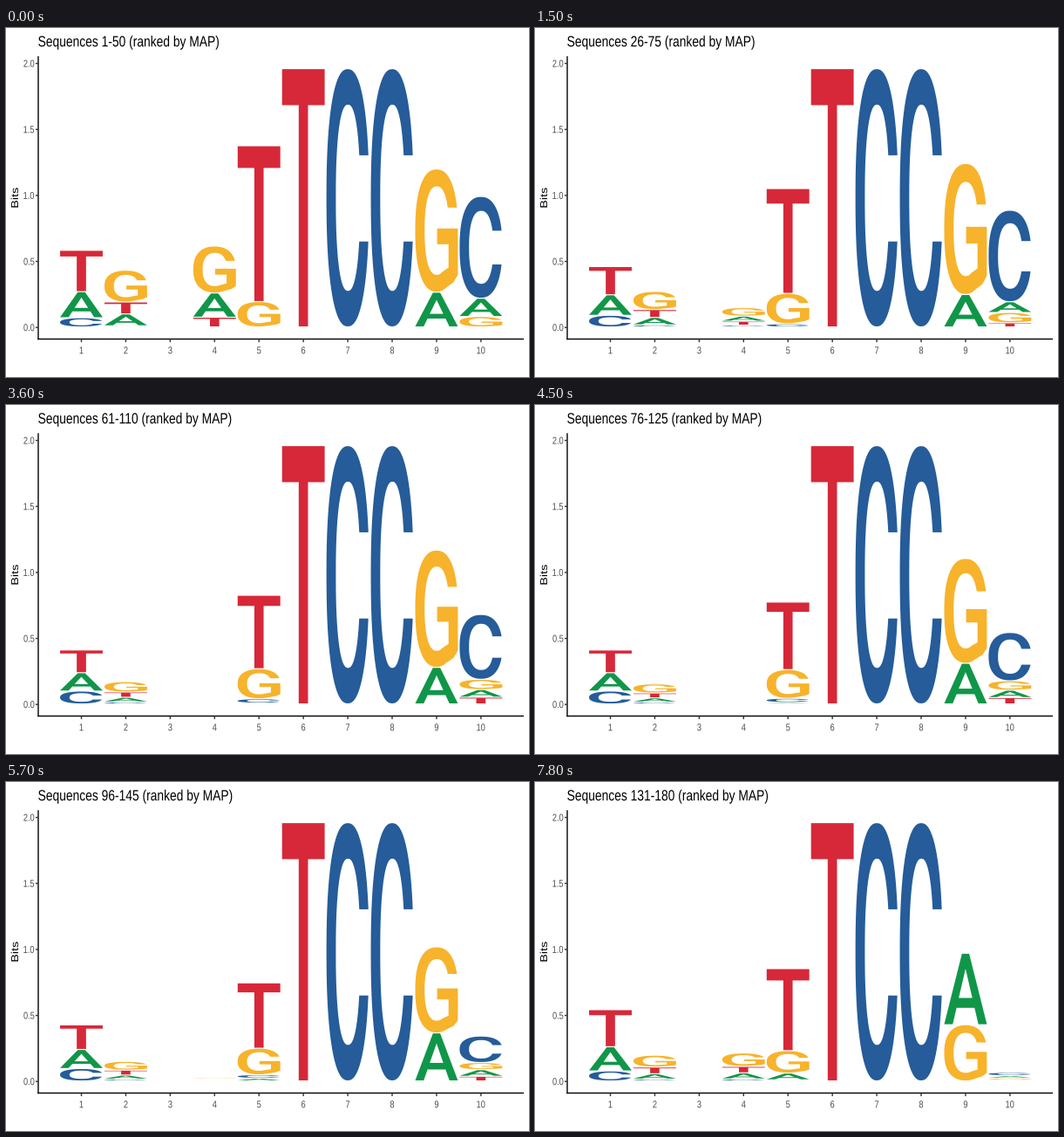
Animation, 600 px wide and 400 px high, one loop 8000 ms. Source, as a matplotlib script:

```python
import numpy as np
import matplotlib.pyplot as plt
from matplotlib.animation import FuncAnimation
from matplotlib.patches import PathPatch
from matplotlib.path import Path
from matplotlib.textpath import TextPath
from matplotlib.transforms import Affine2D

WIDTH, HEIGHT = 600, 400
WINDOW, SHIFT = 50, 5            # sequences per logo, shift per step
FRAME_MS, FRAMES, HOLD = 100, 80, 3
LAST_STEP = (FRAMES - 1) // HOLD

ZERO_Y, BIT_PX = 343.2, 151.3    # y axis in pixels
FIRST_X, COLUMN_PX, LETTER_PX = 86.5, 50.93, 48.9
LEFT, RIGHT, TOP, BOTTOM = 37, 594, 32.3, 356.5
BASE_SIZE, ASPECT = 14.4, 0.8    # the whole plot is squeezed horizontally

CORRECTION = 3 / (2 * np.log(2) * WINDOW)   # small-sample entropy bias
PAD = 0.004 * (2 - CORRECTION)              # gap below each letter, in bits

COLORS = {"A": "#109648", "T": "#D62839", "G": "#F7B32B", "C": "#255C99"}

# Letter counts per column: constant, or (start, middle, end) of a parabola.
# The first item names the letter that takes what remains of the window.
COLUMNS = [
    ("C", {"A": 17, "T": (27, 21, 26)}),
    ("C", {"A": 10.5, "T": (10.5, 12, 13), "G": (28, 23, 23)}),
    ("C", {"A": 12.5, "T": 12.5, "G": 12.5}),
    ("C", {"A": (15, 11, 11), "T": (6, 14, 11.5), "G": (29, 17, 24)}),
    ("C", {"A": (0, 0.5, 3), "T": (43, 33.5, 36.5), "G": (7, 14, 10)}),
    ("T", {}),
    ("C", {}),
    ("C", {}),
    ("G", {"A": (11, 12.5, 28)}),
    ("C", {"A": (7, 4.5, 14), "T": (0, 4, 6), "G": (4, 6, 11)}),
]


def bowl(center, half_width, half_height, low, high, power=2.35):
    """Superellipse arc from the upper right over the left to the lower right."""
    start = np.arcsin(((high - 0.5) / half_height) ** (power / 2))
    stop = 2 * np.pi - np.arcsin(((0.5 - low) / half_height) ** (power / 2))
    angle = np.linspace(start, stop, 90)

    def bulge(wave):
        return np.sign(wave) * np.abs(wave) ** (2 / power)

    return list(zip(center + half_width * bulge(np.cos(angle)),
                    0.5 + half_height * bulge(np.sin(angle))))


def outer_bowl(low, high):
    return bowl(0.5, 0.5, 0.5, low, high)


def inner_bowl(low, high):
    return bowl(0.505, 0.285, 0.362, low, high)[::-1]


def mirrored(half):
    """Complete a right-hand outline with its left-hand reflection."""
    return half + [(1 - x, y) for x, y in reversed(half)]


def letter_path(*contours):
    return Path.make_compound_path(
        *(Path(list(c) + [c[0]], closed=True) for c in contours))


# Letter shapes in the unit square, y up.
LETTERS = {
    "A": letter_path(
        mirrored([(0.585, 1), (1, 0), (0.801, 0), (0.711, 0.233)]),
        [(0.34, 0.373), (0.658, 0.373), (0.5, 0.788)]),
    "T": letter_path(mirrored([(1, 1), (1, 0.86), (0.609, 0.86), (0.609, 0)])),
    "C": letter_path(outer_bowl(0.33, 0.665) + inner_bowl(0.33, 0.665)),
    "G": letter_path(
        outer_bowl(0.03, 0.688)
        + [(0.9, 0.077), (1, 0.14), (1, 0.517), (0.513, 0.517),
           (0.513, 0.388), (0.781, 0.388), (0.781, 0.197)]
        + inner_bowl(0.16, 0.688)),
}


def text_path(text, x, y, size, align=0.0, angle=0):
    """Outline of text on a baseline; align 0, 0.5, 1 = left, centre, right."""
    path = TextPath((0, 0), text, size=size, prop={"family": "Liberation Sans"})
    box = path.get_extents()
    place = (Affine2D().translate(-align * (box.x0 + box.x1), 0)
             .rotate_deg(angle).scale(ASPECT, -1).translate(x, y))
    return path.transformed(place)


def add_path(path, color):
    return ax.add_patch(PathPatch(path, facecolor=color, linewidth=0, snap=False))


def count_at(curve, step):
    start, middle, end = np.broadcast_to(curve, 3)
    t = step / LAST_STEP
    value = (start * (1 - t) * (1 - 2 * t) + middle * 4 * t * (1 - t)
             + end * t * (2 * t - 1))
    return max(0, value)


def letter_bits(rest, curves, step):
    """Height in bits of each letter, smallest first."""
    counts = {k: count_at(v, step) for k, v in curves.items()}
    counts[rest] = max(0, WINDOW - sum(counts.values()))
    share = {k: counts.get(k, 0) / sum(counts.values()) for k in COLORS}
    entropy = -sum(p * np.log2(p) for p in share.values() if p > 0)
    information = max(0, 2 - entropy - CORRECTION)
    return sorted(((k, p * information) for k, p in share.items()),
                  key=lambda item: round(item[1], 9))


def draw_column(index, step):
    x = FIRST_X + index * COLUMN_PX - LETTER_PX / 2
    low, patches = 0, []
    for letter, bits in letter_bits(*COLUMNS[index], step):
        if bits > PAD:
            place = (Affine2D().scale(LETTER_PX, -(bits - PAD) * BIT_PX)
                     .translate(x, ZERO_Y - (low + PAD) * BIT_PX))
            patches.append(add_path(LETTERS[letter].transformed(place), COLORS[letter]))
        low += bits
    return patches


def draw_axes():
    line = dict(color="black", linewidth=1.0, solid_capstyle="butt", snap=False)
    tick = dict(line, color="#333333")
    ax.plot([LEFT, LEFT], [TOP, BOTTOM + 0.7], **line)
    ax.plot([LEFT - 0.7, RIGHT], [BOTTOM, BOTTOM], **line)
    size = 0.8 * BASE_SIZE
    for i in range(5):
        y = ZERO_Y - i * BIT_PX / 2
        ax.plot([LEFT - 3, LEFT], [y, y], **tick)
        add_path(text_path(f"{i / 2:.1f}", 32.8, y + 4, size, align=1), "#4D4D4D")
    for i in range(len(COLUMNS)):
        x = FIRST_X + i * COLUMN_PX
        ax.plot([x, x], [BOTTOM, BOTTOM + 3.6], **tick)
        add_path(text_path(str(i + 1), x, 373.3, size, align=0.5), "#4D4D4D")
    middle = (TOP + BOTTOM) / 2
    add_path(text_path("Bits", 14, middle, BASE_SIZE, align=0.5, angle=90), "black")


shown = []


def update(frame):
    step = frame // HOLD
    while shown:
        shown.pop().remove()
    first = 1 + step * SHIFT
    title = f"Sequences {first}-{first + WINDOW - 1} (ranked by MAP)"
    shown.append(add_path(text_path(title, 36.6, 21.2, 1.2 * BASE_SIZE), "black"))
    for index in range(len(COLUMNS)):
        shown.extend(draw_column(index, step))
    return shown


fig = plt.figure(figsize=(WIDTH / 100, HEIGHT / 100), dpi=100, facecolor="white")
ax = fig.add_axes([0, 0, 1, 1])
ax.set_axis_off()
draw_axes()
ax.set_xlim(0, WIDTH)
ax.set_ylim(HEIGHT, 0)

animation = FuncAnimation(fig, update, frames=FRAMES, interval=FRAME_MS,
                          init_func=lambda: update(0), repeat=True, repeat_delay=0)
plt.show()
```
